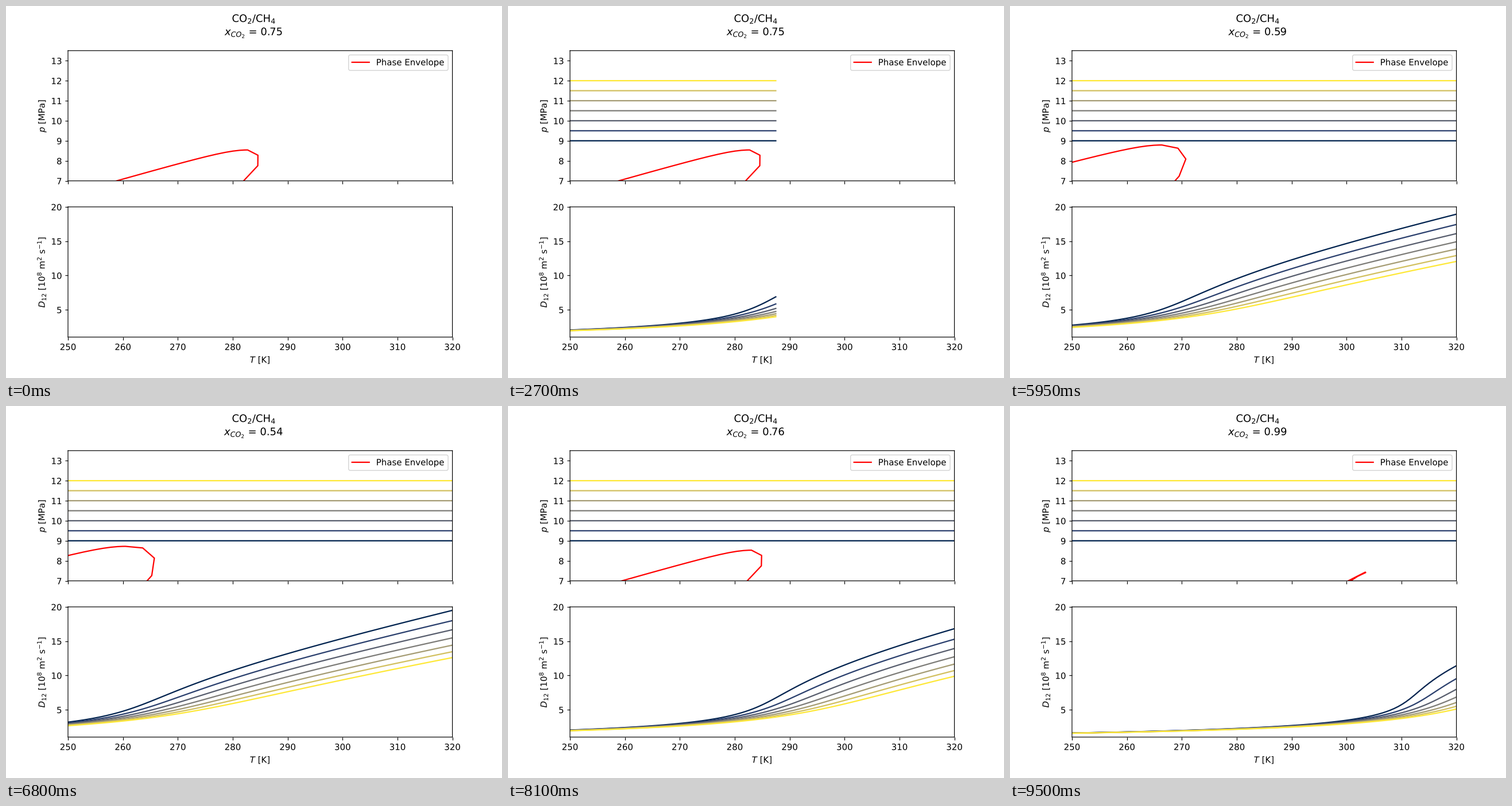
Recreate the animation shown at these times as a matplotlib script. Size 864 px wide and 648 px high, loop 9550 ms.

```python
import numpy as np
import matplotlib.pyplot as plt
from matplotlib.animation import FuncAnimation
from matplotlib.patheffects import Normal

# Draw lines and text as unsnapped outlines for smooth sub-pixel placement
plt.rcParams.update({"path.snap": False, "path.effects": [Normal()]})

R = 8.314
T = np.linspace(250, 320, 100)
PRESSURES = np.linspace(9, 12, 7)

# The isobars grow at a fixed composition, then the composition sweeps
MIXES = np.concatenate([np.full(len(T) + 1, 0.754),
                        np.linspace(0.75, 0.5, 30),
                        np.linspace(0.5, 0.99, 60)])

# Peng-Robinson (Tc, a, kappa); both components share nearly the same covolume
CO2 = (304.13, 0.39627, 0.7064)
CH4 = (190.56, 0.24954, 0.39216)
COVOLUME = 2.667e-5
K12 = 0.1


def envelope(x):
    """Bubble branch as a hyperbola, then an angular nose and the dew branch."""
    u = 1 - x
    t_max = 304.2 - 72 * u - 26 * u**2
    p_max = 7.38 + 5.45 * u - 12 * u**3
    t_apex = t_max - 6 * u - 12 * u**2

    steep = 0.072 + 0.075 * np.exp(-u / 0.1)
    bend = 5.5 * np.tanh((4.5 * u) ** 2)
    d = 30 * np.linspace(1, 0, 16) ** 1.5
    p_bubble = p_max - steep * (np.hypot(d, bend) - bend)

    t_low, p_low = -3.3 + 22 * (u - 0.1) ** 2, -1.6 + 10 * (u - 0.34) ** 2
    nose = np.array([
        (-22 * u**3, -2.1 * u * (1 - 2 * u)),
        (-7 * (u - 0.47) ** 2, -0.8 + 7.5 * (u - 0.29) ** 2),
        (t_low, p_low),
        (t_low - 1.8, p_low - 0.55),
    ])
    return (np.append(t_apex - d, t_max + nose[:, 0]),
            np.append(p_bubble, p_max + nose[:, 1]))


def root_attraction(component):
    tc, a, kappa = component
    return np.sqrt(a) * (1 + kappa * (1 - np.sqrt(T / tc)))


def packing(x):
    """Reduced density for every pressure (rows) and temperature, by bisection."""
    s1, s2 = root_attraction(CO2), root_attraction(CH4)
    a = (x * s1 + (1 - x) * s2) ** 2 - 2 * x * (1 - x) * K12 * s1 * s2
    attraction = a / (COVOLUME * R * T)
    goal = PRESSURES[:, None] * 1e6 * COVOLUME / (R * T)
    lo, hi = np.zeros_like(goal), np.full_like(goal, 0.99)
    for _ in range(30):
        y = (lo + hi) / 2
        p = y / (1 - y) - attraction * y**2 / (1 + 2 * y - y**2)
        lo, hi = np.where(p < goal, y, lo), np.where(p < goal, hi, y)
    return y


def diffusion(x):
    y = packing(x)
    return (2.714 - 3.556 * y + 1.989 * y**2) / y * (T / 320) ** 0.56


fig, (top, bottom) = plt.subplots(2, 1, sharex=True, figsize=(8, 6), dpi=108)
title = fig.suptitle("")
env_line, = top.plot([], [], color="red", label="Phase Envelope")
colors = plt.get_cmap("cividis")(np.linspace(0, 1, len(PRESSURES)))
p_lines = [top.plot([], [], color=c)[0] for c in colors]
d_lines = [bottom.plot([], [], color=c)[0] for c in colors]

top.set_xlim(250, 320)
top.set_ylim(7, 13.5)
top.set_ylabel("$p$ [MPa]")
top.legend(loc="upper right")
bottom.set_ylim(1, 20)
bottom.set_ylabel("$D_{12}$ [$10^8$ m$^2$ s$^{-1}$]")
bottom.set_xlabel("$T$ [K]")


def update(frame):
    x = MIXES[frame]
    n = min(frame, len(T))
    title.set_text(f"CO$_2$/CH$_4$\n$x_{{CO_2}}$ = {x:.2f}")
    env_line.set_data(*envelope(x))
    for p, d, p_line, d_line in zip(PRESSURES, diffusion(x), p_lines, d_lines):
        p_line.set_data(T[:n], np.full(n, p))
        d_line.set_data(T[:n], d[:n])
    return [title, env_line, *p_lines, *d_lines]


anim = FuncAnimation(fig, update, frames=len(MIXES), interval=50,
                     init_func=lambda: update(0), repeat=True, blit=False)
plt.show()
```
